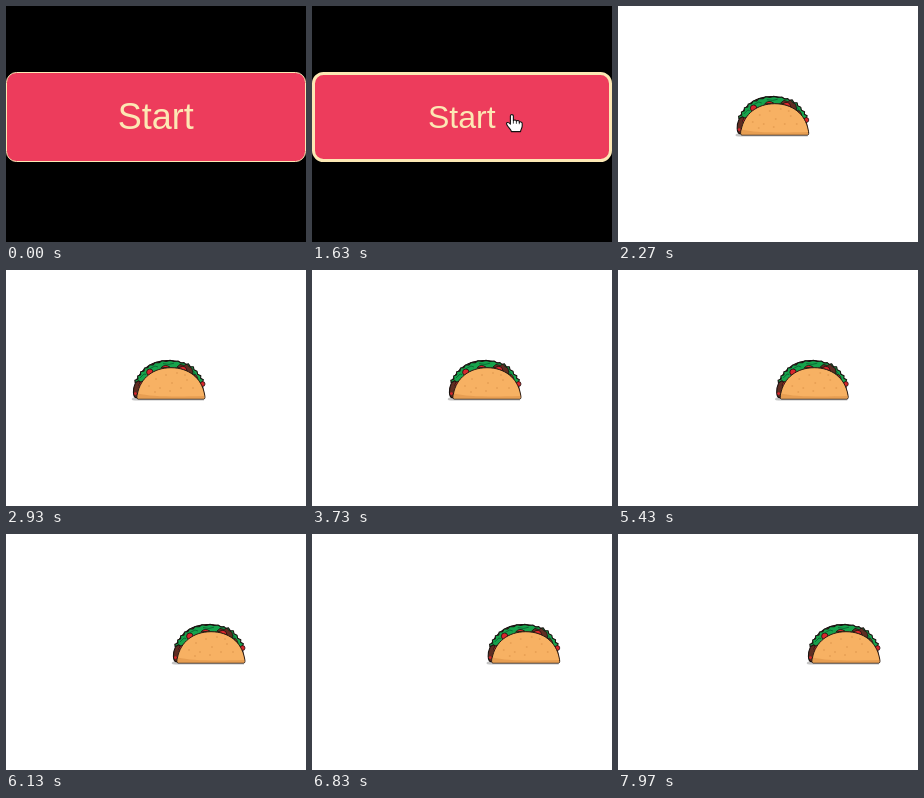
Recreate the animation shown at these times as an HTML page. Size 300 by 236 pixels, loop 8 s.

```html
<!DOCTYPE html>
<html lang="en">
<head>
<meta charset="utf-8">
<title>Start a taco</title>
<style>
  html, body { margin: 0; width: 100%; height: 100%; overflow: hidden; background: #000; }
  svg { display: block; width: 100vw; height: 100vh; }
  text { font-family: "Liberation Sans", Arial, sans-serif; text-anchor: middle; fill: #fce8b4; }
</style>
</head>
<body>
<svg viewBox="0 0 300 236">
  <g id="intro">
    <rect width="300" height="236" fill="#000"/>
    <rect id="button" fill="#ed3c5c" stroke="#fce8b4"/>
    <text id="label" x="149.8">Start</text>
    <g id="cursor" stroke="#111" stroke-width="1.1" stroke-linejoin="round">
      <path id="arrow" fill="#fff" d="M0 0V15L3.4 11.8L5.8 17.2L8.2 16.1L5.9 10.9H10.6Z"/>
      <g id="hand">
        <path fill="#fff" d="M-1.6 9.5V1.4C-1.6-.5 1.4-.5 1.4 1.4V6C2 5 4.2 5.2 4.4 6.6C5 5.4 7.2 5.7 7.3 7V7.8C8.2 6.7 10.2 7.2 10.2 8.9V11.5C10.2 13.6 8.8 14.4 8.5 17H-.6C-1 14.8-3 13.5-4.2 11.6C-5.8 9.3-6 8.2-4.5 7.9C-3.2 7.7-2.4 8.6-1.6 9.5Z"/>
        <path fill="none" stroke-width=".8" d="M1.4 6V9M4.4 6.6V9.2M7.3 7.8V9.6"/>
      </g>
    </g>
  </g>
  <g id="scene">
    <rect width="300" height="236" fill="#fff"/>
    <g id="taco" stroke="#1a1210" stroke-width="1.1" stroke-linejoin="round">
      <path fill="#c4c4c4" stroke="none" d="M125.6 129.2Q126 127.6 128 127.6H198V130.6H129Q126 130.6 125.6 129.2Z"/>
      <path fill="#5f2d22" d="M130 127.6C126.8 127 126.6 119 129.2 113.4C135 98 147 90.8 161 90.6C178 90.6 191 99 196 112L198 126Z"/>
      <path fill="#16a34c" d="M129.2 112.8L128.8 110.2L132 109L131.6 106L134.6 104.8L134.6 101.8L138 101L138.4 98L141.8 97.6L143.4 95L147 95L149 92.6L153 92.8L156 90.8L160 91.4L164 90.4L168 91.4L172 91L175 93L178 92.6L180 94.4L182.4 93.8L184.2 96.6L187.4 96.8L188 99.8L191 101.2L191.6 104.2L194.8 105.8L194.6 108.2L197.4 109.8L196 113L192 112L184 104L172 98L158 98L148 102L140 108L135.6 113L132.6 110.8Z"/>
      <path fill="none" stroke="#0b5c30" stroke-width=".8" d="M134 108L138 104L140 104.6M144 98.6L149 96L152 97M157 93.6L163 94.4L168 93.2M187 101L190 105L191 108"/>
      <path fill="#5f2d22" stroke-width=".8" d="M171 97L174 94.4L178 95.4L181 94.2L183.4 97L186 98.2L187 104L180 101Z"/>
      <g fill="#d9262c" stroke-width=".8">
        <circle cx="143.8" cy="102.2" r="3.2"/>
        <path d="M155 97.8Q159 93.4 164 97.2Z"/>
        <path d="M173 98.4Q176 94.8 179.8 97.6L181 101Z"/>
        <path d="M187.4 104.4Q191 104.4 192 109.4Z"/>
        <circle cx="196.6" cy="114" r="2.4"/>
        <path d="M132.8 115Q134 110.8 137 111.2L134 117Z"/>
        <circle cx="129.4" cy="123.6" r="1.4" stroke="none"/>
      </g>
      <path fill="#f7b163" stroke="#2b1a12" stroke-width="1" d="M132 129C130.6 129 130.9 126.4 131.4 124C134.4 107.8 147.5 97.7 165 97.7C182.6 97.7 195.5 108 198.5 124C199 126.4 199.4 129 197.8 129Z"/>
      <path fill="#e79e52" stroke="none" d="M132 123.4C144 126.4 166 127 198.2 126Q198.7 128.4 197.6 128.4H132.2Q131.3 128.4 132 123.4Z"/>
      <g id="specks" fill="#e29a4f" stroke="none"></g>
    </g>
  </g>
</svg>
<script>
const $ = id => document.getElementById(id);
const set = (id, attrs) => {
  for (const key in attrs) $(id).setAttribute(key, attrs[key]);
};
const show = (id, on) => set(id, { display: on ? "inline" : "none" });

const LOOP = 8000, ENTER = 1000, REST = 1630, CLICK = 1900;
const SPEED = 0.0125; // px per ms

const specks = [[150, 109], [160, 105], [171, 103], [181, 110], [154, 118],
  [166, 113], [175, 118], [187, 118], [143, 116], [164, 121], [179, 105], [149, 122]];
$("specks").innerHTML = specks.map(([x, y]) =>
  `<ellipse cx="${x}" cy="${y}" rx="1" ry=".75"/>`).join("");

function drawButton(hover) {
  const w = hover ? 3 : 1;
  set("button", {
    x: w / 2, y: 66 + w / 2, width: 300 - w, height: 90 - w,
    rx: 10.5 - w / 2 + (hover ? 1 : 0), "stroke-width": w
  });
  set("label", { "font-size": hover ? 32 : 36, y: hover ? 122 : 123 });
}

function drawIntro(t) {
  const p = Math.min(1, Math.max(0, (t - ENTER) / (REST - ENTER)));
  const ease = 1 - (1 - p) ** 2;
  const x = 232 - 32 * ease;
  const y = -18 + 126.6 * ease;
  const hover = y > 66;
  drawButton(hover);
  show("cursor", t >= ENTER);
  show("hand", hover);
  show("arrow", !hover);
  set("cursor", { transform: `translate(${x} ${y})` });
}

function draw(t) {
  const started = t >= CLICK;
  show("intro", !started);
  show("scene", started);
  if (started) set("taco", { transform: `translate(${(t - 2930) * SPEED} 0)` });
  else drawIntro(t);
}

function tick() {
  draw(performance.now() % LOOP);
  requestAnimationFrame(tick);
}
tick();
</script>
</body>
</html>
```
